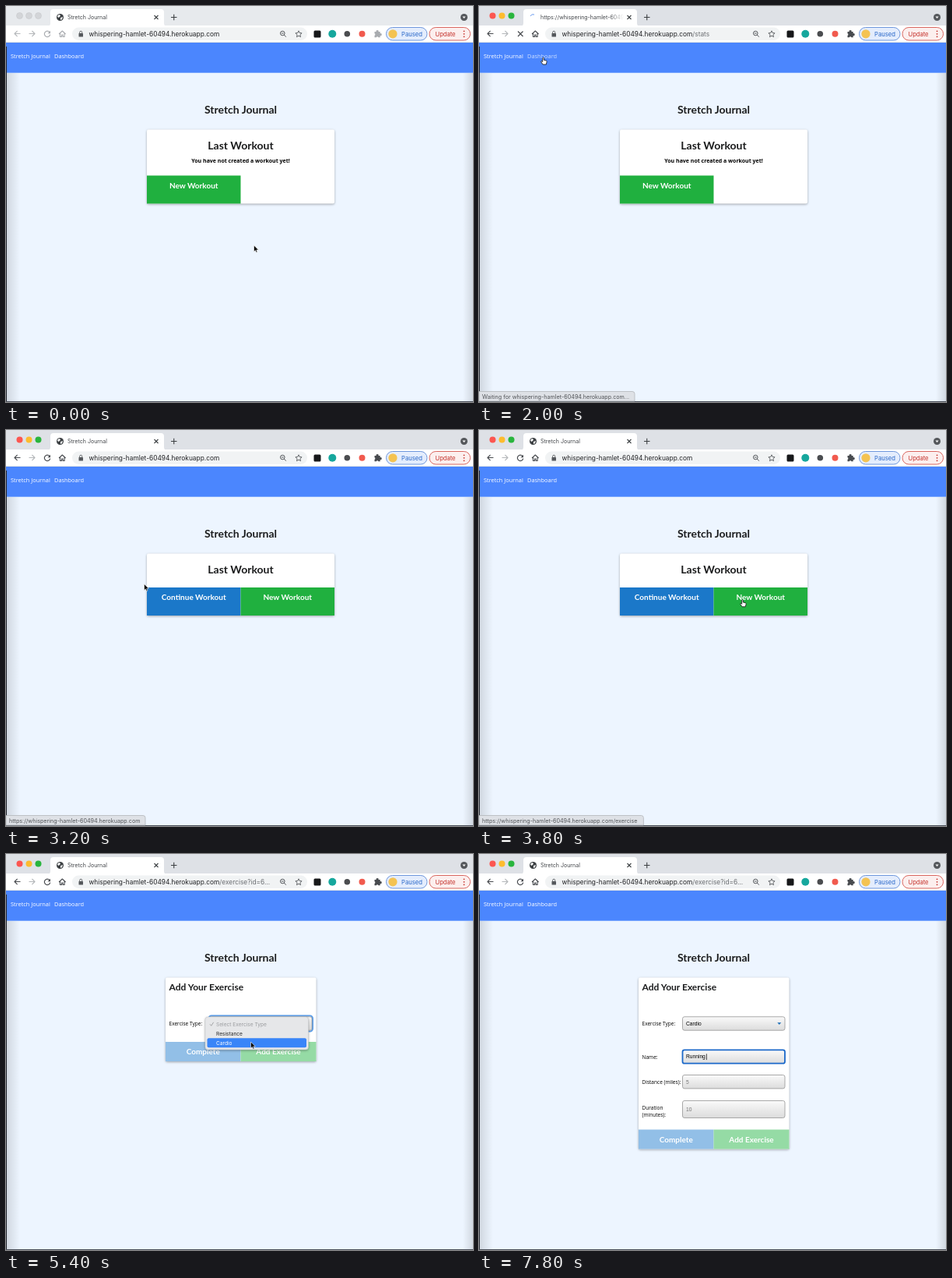
An HTML page for the animation above (8000 ms loop, 600x508 px).

```html
<!DOCTYPE html>
<html lang="en">
<head>
<meta charset="utf-8">
<title>Stretch Journal</title>
<style>
  html, body { margin: 0; width: 100%; height: 100%; overflow: hidden; }
  svg { display: block; width: 600px; height: 508px; }
  text { white-space: pre; }
  .ui { font-family: Inter, sans-serif; }
  .head { font-family: Lato, sans-serif; font-weight: 700; }
  .body { font-family: "Open Sans", sans-serif; }
  .field { font-family: "Liberation Sans", Arial, sans-serif; }
  .shadow { filter: drop-shadow(0 1px 1.5px #0005); }
</style>
</head>
<body>
<svg viewBox="0 0 600 508">
  <defs>
    <linearGradient id="control" x2="0" y2="1">
      <stop stop-color="#fafafa"/><stop offset="1" stop-color="#dcdcdc"/>
    </linearGradient>
    <linearGradient id="edge">
      <stop stop-color="#000" stop-opacity=".12"/><stop offset="1" stop-color="#000" stop-opacity="0"/>
    </linearGradient>
    <linearGradient id="fade">
      <stop stop-color="#fff" stop-opacity="0"/><stop offset="1" stop-color="#fff"/>
    </linearGradient>
  </defs>
  <g id="scene"></g>
</svg>
<script>
const DURATION = 8000, STEP = 200;
const APP = 'Stretch Journal';
const HOST = 'whispering-hamlet-60494.herokuapp.com';
const BLUE = '#1b78c9', GREEN = '#20b03f';
const scene = document.getElementById('scene');

// Events in ms
const AT = {
  focus: 600, hoverStats: 1400, clickStats: 1800, stats: 2200, hoverHome: 2600, home: 2800,
  leaveLink: 3400, exercise: 4000, ready: 4600, openMenu: 5000, choose: 5800, name: 6600, type: 6800
};

// Pointer waypoints: time, x, y
const PATH = [
  [0, 318.5, 307], [400, 318.5, 307], [1400, 84, 68], [1800, 82.5, 66], [2200, 82.5, 66],
  [2600, 32, 66], [2800, 32, 66], [3200, 177.5, 197.5], [3600, 340, 217], [3900, 338, 218],
  [4400, 307.5, 234], [4800, 324, 218], [5000, 322, 218], [5400, 314.5, 241],
  [5700, 316, 242], [6000, 326, 239.5], [6600, 318, 259], [8000, 318, 259]
];

const rect = (x, y, w, h, fill, extra = '') =>
  `<rect x="${x}" y="${y}" width="${w}" height="${h}" fill="${fill}" ${extra}/>`;
const circle = (x, y, r, fill, extra = '') =>
  `<circle cx="${x}" cy="${y}" r="${r}" fill="${fill}" ${extra}/>`;
const path = (d, fill, extra = '') => `<path d="${d}" fill="${fill}" ${extra}/>`;
const line = (d, color, width = 1.1) =>
  path(d, 'none', `stroke="${color}" stroke-width="${width}" stroke-linejoin="round"`);
const text = (kind, x, y, size, fill, content, extra = '') =>
  `<text class="${kind}" x="${x}" y="${y}" font-size="${size}" fill="${fill}" ${extra}>${content}</text>`;
const centered = 'text-anchor="middle"';
const within = (t, from, to) => t >= from && t < to;

function pointerAt(t) {
  const i = Math.max(1, PATH.findIndex(p => p[0] > t));
  const [t0, x0, y0] = PATH[i - 1], [t1, x1, y1] = PATH[i];
  const u = (t - t0) / (t1 - t0), k = u * u * (3 - 2 * u);
  return [x0 + (x1 - x0) * k, y0 + (y1 - y0) * k];
}

function tabStrip(t, active, loading) {
  const lights = active ? ['#fc5650', '#fdbc2e', '#29b53d'] : ['#d3d5d8', '#d3d5d8', '#d3d5d8'];
  const waiting = within(t, AT.clickStats, AT.stats);
  const globe = circle(69.5, 14.5, 4.5, '#3c4043') +
    path('M66 13l2-2 2 1-1 2-2 1zM70 15l3-1-1 3-2 1z', '#fff');
  const spinner = line('M66 13a4 4 0 0 1 5-2', '#6d9df0', 1);
  const icon = waiting ? spinner : loading ? '' : globe;
  return rect(0, 0, 600, 26, active ? '#dee1e6' : '#e7eaed') +
    lights.map((c, i) => circle(17.5 + 12 * i, 12.5, 4, c, active ? '' : 'stroke="#c2c4c7" stroke-width=".5"')).join('') +
    path('M53 26q4 0 4-4V8q0-4 4-4H199q4 0 4 4v14q0 4 4 4z', '#fff') + icon +
    text('ui', 79, 17, 7.05, '#44474b', waiting ? 'https://whispering-hamlet-6049' : APP) +
    rect(168, 8, 18, 14, 'url(#fade)') +
    line('M190.5 12l5 5m0-5l-5 5', '#3c4043') + line('M212 14.5h7.5M215.75 10.7v7.6', '#3c4043') +
    circle(588.5, 14.5, 4.5, '#55585c') + path('M586.5 13.5h4l-2 2.5z', '#fff');
}

function toolbar(t, active, loading) {
  const dark = active ? '#484b4f' : '#a9acb0';
  const back = t >= AT.clickStats ? dark : '#b4b7ba';
  const route = t >= AT.ready ? '/exercise?id=6...' : t >= AT.exercise ? '/exercise'
    : within(t, AT.clickStats, AT.home) ? '/stats' : '';
  const reload = loading
    ? line('M50 32.5l6.5 6.5m0-6.5l-6.5 6.5', dark, 1.2)
    : line('M56 33.6a3.7 3.7 0 1 0 .7 3', dark, 1.2) + path('M57 31.7v3.5h-3.5z', dark);
  return rect(0, 25, 600, 22, '#fff') + rect(0, 46, 600, 1, '#dfe2e6') +
    line('M18.5 35.5H11m3.6-3.7L11 35.5l3.6 3.7', back) +
    line('M29.5 35.5H37m-3.6-3.7l3.6 3.7-3.6 3.7', '#b4b7ba') + reload +
    line('M68 36l4.3-4 4.3 4M69.5 35v4.5h2v-2.5h1.6v2.5h2V35', dark) +
    rect(85, 27.5, 302, 16.5, '#f1f3f4', 'rx="8.2"') +
    rect(93.5, 35, 5.5, 4.5, '#55585c', 'rx=".6"') + line('M94.7 35v-1.3a1.5 1.5 0 0 1 3 0V35', '#55585c', .9) +
    text('ui', 106.5, 38.8, 8.35, '#202124', `${HOST}<tspan fill="#6a6d71">${route}</tspan>`) +
    circle(355.3, 35, 2.8, 'none', 'stroke="#55585c"') + line('M357.3 37l2.5 2.7M354 35h2.6', '#55585c', 1) +
    line('M376 31.8l1.2 2.7 2.9.3-2.2 2 .6 2.9-2.5-1.5-2.5 1.5.6-2.9-2.2-2 2.9-.3z', '#55585c', .9) +
    rect(395.5, 31.5, 9, 9, '#17181a', 'rx="1.5"') + circle(419.3, 35.8, 5, '#16a79d') +
    circle(438.3, 35.8, 3.8, '#4b4d50') + circle(457.5, 35.8, 4, '#f15a4e') +
    path('M473.5 33h2.2a1.5 1.5 0 1 1 2.8 0h2.2v2.2a1.5 1.5 0 1 1 0 2.8v2.2h-2.3a1.4 1.4 0 0 0-2.6 0h-2.3v-2.3a1.4 1.4 0 0 0 0-2.6z', dark) +
    rect(488.5, 27.5, 52.5, 16.5, '#e4edfd', 'rx="8.2" stroke="#6f97dc"') +
    circle(497, 35.8, 5.6, '#f4c352') + text('ui', 508, 38.6, 7.7, '#2867c8', 'Paused') +
    rect(544, 27.5, 52.5, 16.5, '#fcefee', 'rx="8.2" stroke="#d9665f"') +
    text('ui', 551.5, 38.6, 7.6, '#c5332c', 'Update') +
    [32.3, 35.8, 39.3].map(y => circle(588.5, y, .9, '#c5332c')).join('');
}

const button = (x, y, w, h, color, label, baseline) =>
  rect(x, y, w, h, color) + text('head', x + w / 2, baseline, 10, '#fff', label, centered);

const card = (x, w, h) => rect(x, 158.5, w, h, '#fff', 'rx="2" class="shadow"');

function dashboard(t) {
  const title = text('head', 301.5, 183.5, 14, '#1b1c1d', 'Last Workout', centered);
  if (t < AT.stats) {
    return card(181, 241, 95) + title +
      text('body', 301.5, 201, 7, '#000', 'You have not created a workout yet!', centered + ' font-weight="700"') +
      button(181, 217.5, 120.5, 36, GREEN, 'New Workout', 233.7);
  }
  return card(181, 241, 79.5) + title +
    button(181, 202, 120.5, 36, BLUE, 'Continue Workout', 218) +
    button(301.5, 202, 120.5, 36, GREEN, 'New Workout', 218);
}

function control(y, h, label, color, focus) {
  const stroke = focus ? '#1c69c9' : '#a0a0a0';
  return rect(261.5, y, 131.5, h, 'url(#control)', `rx="2.5" stroke="${stroke}" stroke-width="${focus ? 1.8 : .9}"`) +
    text('field', 266, y + h / 2 + 2.4, 6.67, color, label);
}

const label = (y, content) => text('body', 209.5, y, 6.55, '#000', content);

function menu(t) {
  const [, y] = pointerAt(t);
  const hover = y > 236 ? 2 : y > 224.5 ? 1 : 0;
  const items = ['Select Exercise Type', 'Resistance', 'Cardio'];
  return rect(256, 209, 132.5, 42, '#e6e7e9', 'rx="3.5" class="shadow" stroke="#c3c5c8" stroke-width=".5"') +
    (hover ? rect(258.5, 224.3 + 12 * (hover - 1), 127.5, 12, '#3985f8', 'rx="2"') : '') +
    line('M262 218.3l1.7 2 3-4.5', '#9a9c9f', .9) +
    items.map((s, i) => text('ui', 270, 220.5 + 12 * i, 6.6, i === 0 ? '#9a9c9f' : i === hover ? '#fff' : '#242526', s)).join('');
}

function exercise(t) {
  const chosen = t >= AT.choose, naming = t >= AT.name;
  const bottom = chosen ? 378.5 : 266;
  const selectFocus = within(t, AT.openMenu, AT.name);
  const typed = 'Running'.slice(0, Math.max(0, Math.floor((t - AT.type) / 140)));
  let out = card(205, 193.5, bottom - 158.5) +
    text('head', 209.5, 174.6, 12, '#1b1c1d', 'Add Your Exercise') + label(220.3, 'Exercise Type:') +
    (selectFocus ? rect(260.5, 207.5, 133.5, 20, 'none', 'rx="3.5" stroke="#5b9de8" stroke-width="2"') : '') +
    control(208.8, 17.4, chosen ? 'Cardio' : 'Select Exercise Type', '#000', false) +
    path('M383.3 216.3h5l-2.5 2.8z', '#1e6fb8');
  if (chosen) {
    out += label(262.7, 'Name:') + control(251.3, 17.4, typed || 'Running', typed ? '#000' : '#757575', naming) +
      label(295.2, 'Distance (miles):') + control(283.5, 17.4, '5', '#757575', false) +
      label(328, 'Duration') + label(337, '(minutes):') + control(316.5, 22, '10', '#757575', false);
    if (naming) out += rect(266 + 3.7 * typed.length, 256.3, .7, 7.8, '#000');
  }
  out += button(205, bottom - 25, 96.5, 25, '#92bfe7', 'Complete', bottom - 8.7) +
    button(301.5, bottom - 25, 97, 25, '#95dba5', 'Add Exercise', bottom - 8.7);
  return out + (within(t, AT.openMenu, AT.choose) ? menu(t) : '');
}

function page(t) {
  const heading = text('head', 301.5, 137.7, 14, '#1b1c1d', APP, centered);
  const content = within(t, AT.stats, AT.home) ? ''
    : heading + (t >= AT.exercise ? exercise(t) : dashboard(t));
  const hover = within(t, AT.hoverStats, AT.hoverHome) ? '#cfe0ff' : '#fff';
  return rect(0, 47, 600, 461, '#edf5ff') + rect(0, 47, 600, 38.7, '#4b86fe') +
    text('body', 6, 66.8, 7.4, '#fff', APP) + text('body', 62, 66.8, 7.4, hover, 'Dashboard') +
    rect(1, 86, 17, 422, 'url(#edge)') +
    rect(-600, 86, 13, 422, 'url(#edge)', 'transform="scale(-1 1)"') +
    content + rect(0, 52, 1, 456, '#22262e') + rect(0, 507, 600, 1, '#4b505a');
}

function status(t, loading) {
  const link = within(t, AT.hoverStats, AT.clickStats) ? '/stats'
    : within(t, AT.hoverHome, AT.leaveLink) ? '' : within(t, AT.leaveLink, AT.exercise) ? '/exercise' : null;
  if (!loading && link === null) return '';
  const message = loading ? `Waiting for ${HOST}...` : `https://${HOST}${link}`;
  const width = loading ? 200 : 179 + 3.6 * link.length;
  return path(`M0 494.5H${width - 3}q3 0 3 3V507H0z`, '#dee1e6', 'stroke="#b3b6ba" stroke-width=".8"') +
    text('ui', 4, 503.7, 7.18, '#505357', message);
}

function pointer(t) {
  if (t >= AT.type) return '';
  const [x, y] = pointerAt(t);
  const hand = within(t, AT.hoverStats, AT.home + 1) || within(t, 3500, AT.exercise);
  const shape = hand
    ? path('M-.8 .6Q0-.6.8.6V3.3l3 .7q1 .4.8 1.5L3.8 9H-.4L-2.8 5.6q0-1.2 1.2-.8l.8.8z', '#fff', 'stroke="#111" stroke-width=".8"')
    : path('M0 0V8.2L1.9 6.4 3.1 9.2 4.5 8.6 3.3 5.9H5.9Z', '#000', 'stroke="#fff" stroke-width=".6"');
  return `<g transform="translate(${x} ${y})">${shape}</g>`;
}

function render(t) {
  const active = t >= AT.focus;
  const loading = within(t, AT.clickStats, AT.stats) || within(t, AT.exercise, AT.ready);
  scene.innerHTML = page(t) + tabStrip(t, active, loading) + toolbar(t, active, loading) +
    status(t, loading) + pointer(t);
}

const start = performance.now();
let shown = -1;
function tick() {
  const t = Math.floor((performance.now() - start) % DURATION / STEP) * STEP;
  if (t !== shown) render(shown = t);
  requestAnimationFrame(tick);
}
tick();
</script>
</body>
</html>
```
